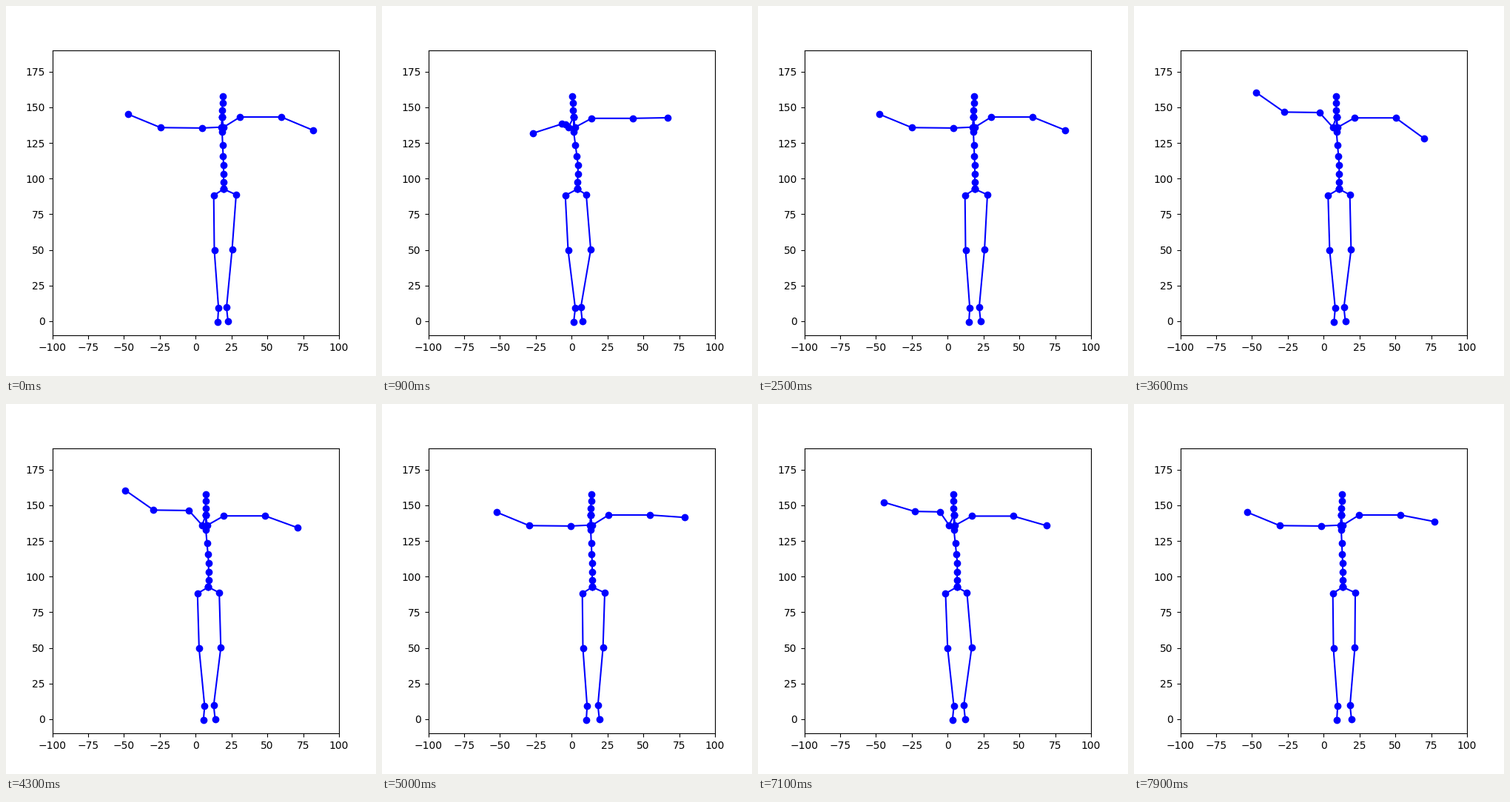
Animation of 500x500 px, one loop 8 s. Source, as a matplotlib script:

```python
import numpy as np
import matplotlib.pyplot as plt
from matplotlib.animation import FuncAnimation

FRAMES, STEP = 80, 100
LOOP = FRAMES * STEP

# The left arm swings out -> up -> folded -> out around each of these times.
FOLD_TIMES = np.array([900, 3950, 6850])
FOLD_HALF = 900

# Slow drift of the pelvis x and the right forearm angle, eased between keys.
KEY_TIMES = [0, 900, 1900, 2500, 3600, 5000, 6300, 7900]
PELVIS = [294, 285, 300, 293, 291, 284, 290, 282]
FOREARM_ANGLE = [22.7, -1, 8, 22, 36, 4, 21, 11]

# Left arm poses from stretched out to folded:
# collar dx, shoulder dx, shoulder y, upper arm dx, forearm dx, forearm dy
ARM_POSES = [
    [-1, -27.5, 164.9, -55.7, -43.7, -18],
    [-1, -26, 157, -56, -28, -37],
    [-5, -23, 144, -48, -38, -27],
    [-7, -11, 160, -5, -39, 12.5],
]
ARM_CURVE = np.polyfit(range(4), ARM_POSES, 3)

SPINE_Y = np.array([122, 131, 141, 150, 170, 188, 203, 215, 227, 238, 247.4])
LEFT_LEG_Y = [256, 330.4, 408.3, 427.2]
RIGHT_LEG_Y = [255, 329.3, 407.3, 426.3]


def ease_keys(now, values):
    """Smoothstep from one key to the next."""
    pos = np.interp(now, KEY_TIMES, range(len(KEY_TIMES)))
    i = min(int(pos), len(values) - 2)
    s = pos - i
    return values[i] + (values[i + 1] - values[i]) * s * s * (3 - 2 * s)


def fold_amount(now):
    """0 with the arm stretched out, 3 with the arm folded in."""
    d = np.min(np.abs(now - FOLD_TIMES)) / FOLD_HALF
    return 1.5 * (1 + np.cos(np.pi * min(d, 1)))


def column(x, y):
    return np.column_stack([x, y])


def to_data(points):
    """Stage pixels to axis units."""
    x, y = points.T
    return (x - 256.25) / 1.9375, (425.75 - y) / 1.925


def skeleton(now):
    fold = fold_amount(now)
    bend = (fold / 3) ** 2
    drift = now / LOOP
    pelvis = ease_keys(now, PELVIS) - 7 * fold

    # The torso leans as the arm folds; the right foot stays behind the drift.
    lean = np.array([-1.2, -2, -2, 0, 0]) + bend * np.array([-6, -3, -3, 1, 0])
    spine_x = pelvis + np.interp(SPINE_Y, [122, 150, 170, 215, 247.4], lean)
    neck, chest = spine_x[3], spine_x[4]

    left = np.array([-13.3, -12.5, -6.8, -8]) + bend * np.array([-3, 0, 4, 3])
    right = (np.array([17, 11.5, 4, 6]) + drift * np.array([0, 5, 6, 6])
             + bend * np.array([-5, 6, 0, 0]))

    collar, sh_dx, sh_y, upper, fore_dx, fore_dy = np.vander([fold], 4)[0] @ ARM_CURVE
    left_arm_x = chest + np.array([collar, sh_dx, sh_dx + upper,
                                   sh_dx + upper + fore_dx])
    left_arm_y = [163.7, sh_y, sh_y - .6, sh_y - .6 + fore_dy]

    angle = np.radians(ease_keys(now, FOREARM_ANGLE))
    right_arm_x = chest + np.array([1.7, 24.3, 80.1, 80.1 + 47 * np.cos(angle)])
    level = 150 + .6 * fold
    right_arm_y = [164, level, level, level + 47 * np.sin(angle)]

    root = (pelvis, SPINE_Y[-1])
    collar_top = (neck, SPINE_Y[3])
    return [column(spine_x, SPINE_Y),
            np.vstack([collar_top, column(left_arm_x, left_arm_y)]),
            np.vstack([collar_top, column(right_arm_x, right_arm_y)]),
            np.vstack([root, column(pelvis + left, LEFT_LEG_Y)]),
            np.vstack([root, column(pelvis + right, RIGHT_LEG_Y)])]


fig, ax = plt.subplots(figsize=(5, 5), dpi=100)
ax.set_xlim(-100, 100)
ax.set_ylim(-10, 190)
chains = [ax.plot([], [], "bo-")[0] for _ in range(5)]


def draw(frame):
    for line, points in zip(chains, skeleton(frame * STEP)):
        line.set_data(*to_data(points))
    return chains


anim = FuncAnimation(fig, draw, frames=FRAMES, interval=STEP, repeat=True,
                     repeat_delay=0)
plt.show()
```
